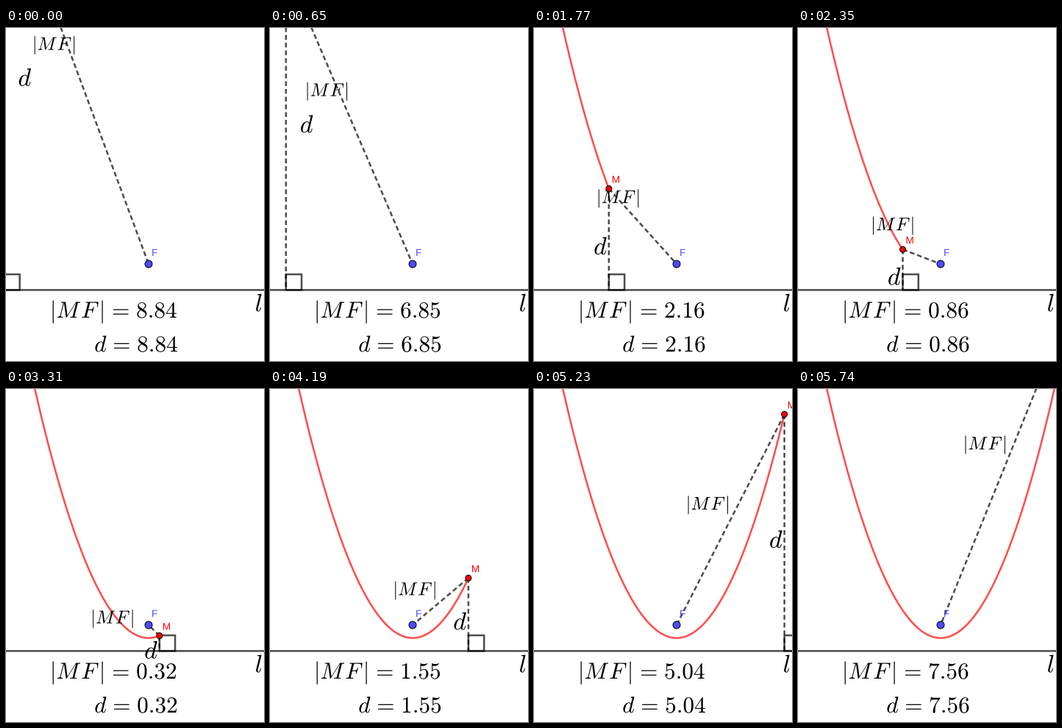
A matplotlib script for the animation above (5800 ms loop, 351 px wide and 453 px high).

```python
import matplotlib as mpl
import matplotlib.pyplot as plt
import numpy as np
from matplotlib.animation import FuncAnimation
from matplotlib.patches import Circle, PathPatch, Rectangle
from matplotlib.textpath import TextPath
from matplotlib.transforms import Affine2D

W, H, DPI = 351, 453, 64
PX = 72 / DPI                  # points per pixel
LOOP, TICK = 5800, 20          # ms
HOLD, STEP, LAST = 284, 73.65, 75

SCALE = 63.9                   # pixels per unit
P = 0.553                      # distance from focus to directrix, in units
FX, LINE_Y = 194, 356.4
FY = LINE_Y - P * SCALE
SIDE = 21.3                    # right-angle mark
GAP = 16                       # label distance from its segment

BLACK, RED, BLUE = "#000000", "#ff0000", "#4d4dff"
MF = r"|M\hspace{0.124}F\hspace{0.158}|"
EQUALS = r"\hspace{0.116}=\hspace{0.116}"

mpl.rcParams.update({
    "mathtext.fontset": "cm",
    "font.family": "Liberation Sans",
    "path.snap": False,
})

fig = plt.figure(figsize=(W / DPI, H / DPI), dpi=DPI, facecolor="white")
ax = fig.add_axes([0, 0, 1, 1])
ax.set_xlim(0, W)
ax.set_ylim(H, 0)
ax.axis("off")

glyphs = {}


def outline(text, size):
    key = text, size
    if key not in glyphs:
        glyphs[key] = TextPath((0, 0), text, size=size)
    return glyphs[key]


def place(patch, x, y):
    patch.set_transform(Affine2D().scale(1, -1).translate(x, y) + ax.transData)


def label(text, size, x=0, y=0, color=BLACK):
    patch = PathPatch(outline(text, size), facecolor=color, lw=0, zorder=5)
    ax.add_patch(patch)
    place(patch, x, y)
    return patch


def stroke(color=BLACK, dashed=False, **kw):
    style = (0, (2.6, 1.6)) if dashed else "-"
    line, = ax.plot([], [], color=color, alpha=0.7, lw=2.5 * PX,
                    ls=style, **kw)
    return line


def dot(x, y, radius, color):
    patch = Circle((x, y), radius, facecolor=color, edgecolor=BLACK,
                   lw=PX, zorder=6)
    ax.add_patch(patch)
    return patch


def height(x):
    """Distance of the parabola from the directrix, in units."""
    return (x * x + P * P) / (2 * P)


def point_x(step):
    """Nearly even travel, slightly slower towards both ends."""
    s = step - 39.1
    drag = 1.83e-8 if s < 0 else 1.6e-8
    return 0.0798 * s - drag * np.sign(s) * s ** 4


def to_px(x):
    return FX + x * SCALE, LINE_Y - height(x) * SCALE


directrix = stroke(zorder=2)
directrix.set_data([-5, W + 5], [LINE_Y, LINE_Y])
curve = stroke(RED, zorder=2)
drop = stroke(dashed=True, zorder=3)
radius = stroke(dashed=True, zorder=3)
corner = Rectangle((0, LINE_Y - SIDE), SIDE, SIDE, fill=False,
                   edgecolor=BLACK, alpha=0.7, lw=2.5 * PX, zorder=3)
ax.add_patch(corner)

dot(FX, FY, 5, BLUE)
point = dot(0, 0, 4, RED)

label("F", 13.5, FX + 4, FY - 11, BLUE)
label("$l$", 34, 338.7, 385.5)
m_label = label("M", 13.5, color=RED)
d_label = label("$d$", 34)
mf_label = label(f"${MF}$", 25)
mf_value = label(f"${MF}$", 31.3, 59.8, 394)
d_value = label("$d$", 31.3, 120.2, 440.4)


def draw(tick):
    t = tick * TICK + TICK / 2
    step = int(np.clip((t - HOLD) // STEP + 1, 0, LAST))
    x = point_x(step)
    mx, my = to_px(x)

    curve.set_data(*to_px(np.linspace(point_x(0), x, 160)))
    drop.set_data([mx, mx], [my, LINE_Y])
    radius.set_data([mx, FX], [my, FY])
    corner.set_x(mx)
    point.center = mx, my
    place(m_label, mx + 4, my - 8)

    # The label swaps sides where it would leave the stage.
    mid = (my + LINE_Y) / 2
    if 29 <= mx <= 360:
        place(d_label, mx - 20.7, mid + 20.7)
    else:
        place(d_label, mx + 19, mid + 4.8)

    dx, dy = mx - FX, my - FY
    push = GAP / np.hypot(dx, dy)
    place(mf_label, (mx + FX) / 2 - dy * push - 75,
          (my + FY) / 2 + dx * push - 21)

    number = f"{height(x):.2f}"
    mf_value.set_path(outline(f"${MF}{EQUALS}{number}$", 31.3))
    d_value.set_path(outline(f"$d{EQUALS}{number}$", 31.3))
    return ()


anim = FuncAnimation(fig, draw, frames=LOOP // TICK, interval=TICK,
                     repeat=True, repeat_delay=0, blit=False)
plt.show()
```
